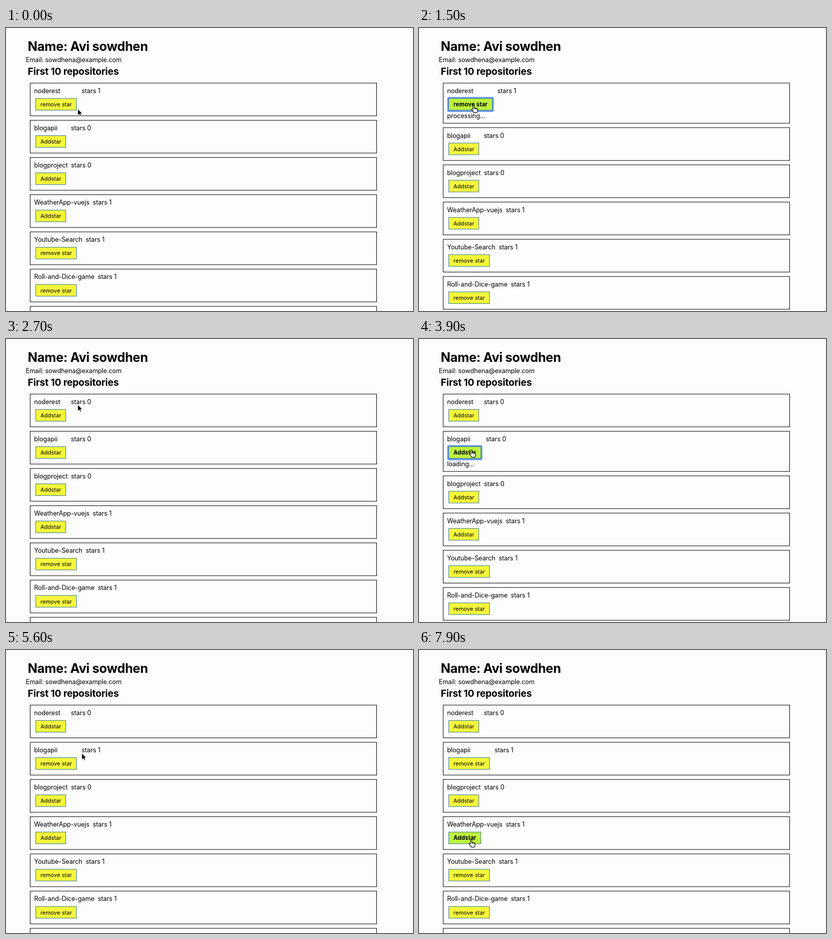
An HTML page that plays this animation: 800 px wide and 556 px high, repeating every 8000 ms.

```html
<!DOCTYPE html>
<html lang="en">
<head>
<meta charset="utf-8">
<title>Repository stars</title>
<style>
  html, body { margin: 0; width: 100%; height: 100%; overflow: hidden; background: #fefdfe; }
  svg { display: block; width: 800px; height: 556px; }
  text { font: 12.5px Inter, "Open Sans", sans-serif; letter-spacing: -.08px; fill: #000; }
  .h1 { font-size: 25px; font-weight: 700; letter-spacing: -.34px; }
  .h2 { font-size: 19px; font-weight: 700; letter-spacing: -.2px; }
  .label { font-size: 10.9px; letter-spacing: .08px; text-anchor: middle; }
  .bold { font-size: 11.2px; font-weight: 700; letter-spacing: .15px; }
  .card { fill: none; stroke: #000; }
  .btn { fill: #f5f63c; stroke: #2f7a98; }
  .btn.hot { fill: #bdf23c; }
  .ring { fill: none; stroke: #6a9cee; stroke-width: 3.2; }
</style>
</head>
<body>
<svg viewBox="0 0 800 556">
  <text class="h1" x="42.8" y="45">Name: Avi sowdhen</text>
  <text x="39" y="66.7">Email: sowdhena@example.com</text>
  <text class="h2" x="42.8" y="92">First 10 repositories</text>
  <g id="list"></g>
  <g id="cursor">
    <path id="arrow" d="M0 0V12.6L2.9 9.9L4.9 14.3L7 13.4L5.1 9.2H9.1Z" fill="#000" stroke="#fff" stroke-width=".8"/>
    <g id="hand" stroke="#000" stroke-linejoin="round" transform="translate(-.5 -1.2)">
      <path d="M-1.3 8V1.2a1.3 1.3 0 0 1 2.6 0V5.3L6.2 6.3Q8.2 6.9 8 9L7.2 12.2L6.4 14.6H.4L-1.4 11.8L-4 8.7Q-4.3 7 -2.7 7.2Z" fill="#fff" stroke-width="1.1"/>
      <path d="M1.3 5.3V7.8M3.6 5.9V8.2M5.9 6.4V8.6" fill="none" stroke-width=".9"/>
    </g>
  </g>
</svg>
<script>
const LOOP = 8000, STEP = 100;
const TOP = 108.2, PITCH = 73.1, HEIGHT = 64.4, EXTRA = 14.5;
const BTN_X = 58.5, BTN_H = 23;

// name, stars, starred by the viewer
const repos = [
  ["noderest", 1, true], ["blogapii", 0, false], ["blogproject", 0, false],
  ["WeatherApp-vuejs", 1, false], ["Youtube-Search", 1, true], ["Roll-and-Dice-game", 1, true]
];

const clicks = [
  { row: 0, from: 1100, to: 2100, note: "processing..." },
  { row: 1, from: 3700, to: 4900, note: "loading..." }
];

// time, x, y of the pointer tip
const path = [
  [0, 141, 159], [900, 108, 153], [2100, 108, 153], [2700, 141, 129], [2900, 222, 142],
  [3200, 104, 219], [4200, 104, 219], [4400, 129, 219], [5600, 149, 203], [6300, 222, 330],
  [7000, 210, 415], [7300, 106, 444], [7900, 103, 374]
];

const $ = id => document.getElementById(id);
const ease = k => k * k * (3 - 2 * k);

const pen = document.createElement("canvas").getContext("2d");
pen.font = '12.5px Inter, "Open Sans", sans-serif';
const textWidth = str => pen.measureText(str).width - .08 * str.length;

function pointAt(t) {
  const i = path.findIndex(p => p[0] > t);
  if (i < 0) return path[path.length - 1].slice(1);
  const [t0, x0, y0] = path[i - 1], [t1, x1, y1] = path[i];
  const k = ease((t - t0) / (t1 - t0));
  return [x0 + (x1 - x0) * k, y0 + (y1 - y0) * k];
}

function text(x, y, str, cls = "") {
  return `<text class="${cls}" x="${x}" y="${y.toFixed(1)}">${str}</text>`;
}

function rect(x, y, w, h, cls, r = 0) {
  return `<rect class="${cls}" x="${x}" y="${y}" width="${w}" height="${h}" rx="${r}"/>`;
}

function card([name, stars, starred], row, y, t, [px, py]) {
  const click = clicks.find(c => c.row === row);
  const busy = click && t >= click.from && t < click.to;
  if (click && t >= click.to) {
    starred = !starred;
    stars += starred ? 1 : -1;
  }

  const btnY = y + 30.2;
  const plain = starred ? 80 : 59;
  const hot = px > BTN_X && px < BTN_X + plain && py > btnY && py < btnY + BTN_H;
  const width = hot ? (starred ? 85.5 : 63) : plain;
  const starX = Math.max(BTN_X + width + 10, 55.2 + textWidth(name) + 6.5);
  const height = HEIGHT + (busy ? EXTRA : 0);

  let svg = rect(47.5, y, 681, height, "card");
  svg += text(55.2, y + 19.7, name) + text(starX, y + 19.7, "stars " + stars);
  if (busy) {
    svg += rect(BTN_X - 1.5, btnY - 1.3, width + 3, BTN_H + 3.4, "ring", 2);
    svg += text(55.2, y + 68.3, click.note);
  }
  svg += rect(BTN_X, btnY, width, BTN_H, hot ? "btn hot" : "btn");
  svg += text(BTN_X + width / 2 + .2, y + 45.8, starred ? "remove star" : "Addstar", hot ? "label bold" : "label");
  return { svg, hot, next: y + height + PITCH - HEIGHT };
}

function draw(t) {
  // hover styles trail the pointer by one step
  const under = pointAt(Math.max(0, t - STEP));
  let y = TOP, svg = "", hot = false;
  repos.forEach((repo, row) => {
    const c = card(repo, row, y, t, under);
    svg += c.svg;
    hot = hot || c.hot;
    y = c.next;
  });
  svg += rect(47.5, y, 681, HEIGHT, "card");

  $("list").innerHTML = svg;
  $("cursor").setAttribute("transform", `translate(${pointAt(t)})`);
  $("arrow").style.display = hot ? "none" : "";
  $("hand").style.display = hot ? "" : "none";
}

const start = performance.now();
let last = -1;
function tick() {
  const t = Math.floor((performance.now() - start) % LOOP / STEP) * STEP;
  if (t !== last) draw(last = t);
  requestAnimationFrame(tick);
}
tick();
</script>
</body>
</html>
```
